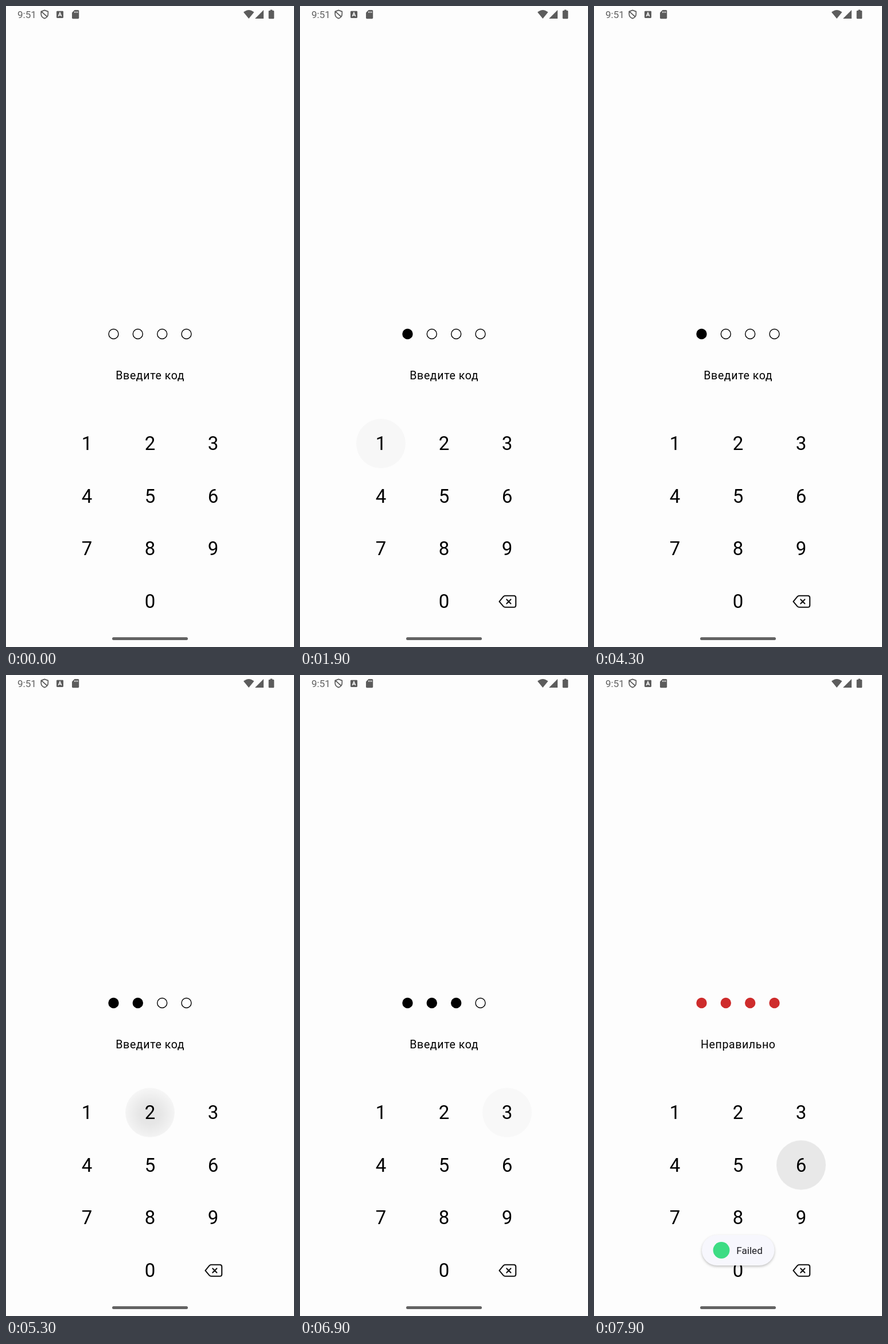
An HTML page that plays this animation: 502 px wide and 1116 px high, repeating every 8 s.

```html
<!DOCTYPE html>
<html lang="ru">
<head>
<meta charset="utf-8">
<title>PIN</title>
<style>
html, body { margin: 0; width: 100%; height: 100%; overflow: hidden; background: #fdfdfd; }
svg { display: block; width: 100vw; height: 100vh; }
text { font-family: Roboto, "Open Sans", sans-serif; }

.status text { font-size: 17.1px; fill: #606060; }
.icons { fill: #5c5c5c; }
.label { font-size: 19.54px; letter-spacing: .61px; text-anchor: middle; }
.keys { font-size: 33px; text-anchor: middle; }
.dots circle { fill: transparent; stroke: #000; stroke-width: 1.4; }
.erase { fill: none; stroke: #111; stroke-width: 2.1; stroke-linejoin: round; stroke-linecap: round; }
.ripple circle { opacity: 0; }

.dots circle, .erase, .label, .ripple circle { animation: 8s step-end infinite; }

/* Code dots */
.dots .d1 { animation-name: dot1; }
.dots .d2 { animation-name: dot2; }
.dots .d3 { animation-name: dot3; }
.dots .d4 { animation-name: dot4; }
@keyframes dot1 {
  0%, 37.5% { fill: transparent; stroke: #000; }
  16.25%, 53.75% { fill: #000; stroke: #000; }
  95%, 100% { fill: #ce2c2c; stroke: #ce2c2c; }
}
@keyframes dot2 {
  0% { fill: transparent; stroke: #000; }
  66.25% { fill: #000; stroke: #000; }
  95%, 100% { fill: #ce2c2c; stroke: #ce2c2c; }
}
@keyframes dot3 {
  0% { fill: transparent; stroke: #000; }
  78.75% { fill: #000; stroke: #000; }
  95%, 100% { fill: #ce2c2c; stroke: #ce2c2c; }
}
@keyframes dot4 {
  0% { fill: transparent; stroke: #000; }
  95%, 100% { fill: #ce2c2c; stroke: #ce2c2c; }
}

.erase { animation-name: erase; }
@keyframes erase {
  0%, 37.5% { opacity: 0; }
  16.25%, 53.75%, 100% { opacity: 1; }
}

.ask { animation-name: ask; }
.wrong { animation-name: wrong; }
@keyframes ask { 0% { opacity: 1; } 95%, 100% { opacity: 0; } }
@keyframes wrong { 0% { opacity: 0; } 95%, 100% { opacity: 1; } }

/* Key presses: a soft glow, then a flat disc that pales */
.k1 .glow { animation-name: glow1; }
.k1 .flat { animation-name: flat1; }
.k2 .glow { animation-name: glow2; }
.k2 .flat { animation-name: flat2; }
.k3 .glow { animation-name: glow3; }
.k3 .flat { animation-name: flat3; }
.k6 .glow { animation-name: glow6; }
.k6 .flat { animation-name: flat6; }
@keyframes glow1 {
  0%, 17.5%, 61.25%, 100% { opacity: 0; }
  16.25% { opacity: 1; }
  55% { opacity: .85; }
}
@keyframes flat1 {
  0%, 37.5%, 66.25%, 100% { opacity: 0; }
  17.5% { opacity: .058; }
  23.75%, 61.25% { opacity: .025; }
}
@keyframes glow2 {
  0%, 67.5%, 100% { opacity: 0; }
  66.25% { opacity: 1; }
}
@keyframes flat2 {
  0%, 78.75%, 100% { opacity: 0; }
  67.5% { opacity: .05; }
  72.5% { opacity: .022; }
}
@keyframes glow3 {
  0%, 80%, 100% { opacity: 0; }
  78.75% { opacity: 1; }
}
@keyframes flat3 {
  0%, 95%, 100% { opacity: 0; }
  80% { opacity: .083; }
  86.25% { opacity: .022; }
}
@keyframes glow6 {
  0%, 96.25%, 100% { opacity: 0; }
  95% { opacity: 1; }
}
@keyframes flat6 {
  0% { opacity: 0; }
  96.25%, 100% { opacity: .083; }
}

/* Toast */
.toast {
  transform-origin: 251px 1001.5px;
  filter: drop-shadow(0 2px 2px rgba(0, 0, 0, .24));
  animation: toast 8s linear infinite;
}
.toast text { font-size: 17.1px; fill: #1b1b20; }
.inner { animation: inner 8s linear infinite; }
@keyframes toast {
  0%, 95.6% { opacity: 0; transform: scale(.9); }
  97% { opacity: 1; }
  98.7%, 100% { opacity: 1; transform: none; }
}
@keyframes inner {
  0%, 96.2% { opacity: 0; }
  98.7%, 100% { opacity: 1; }
}
</style>
</head>
<body>
<svg viewBox="0 0 502 1116">
  <defs>
    <radialGradient id="tight" gradientUnits="userSpaceOnUse" cx="-2" cy="6" r="42">
      <stop offset="0" stop-opacity=".105"/>
      <stop offset=".35" stop-opacity=".09"/>
      <stop offset=".7" stop-opacity=".04"/>
      <stop offset="1" stop-opacity="0"/>
    </radialGradient>
    <radialGradient id="wide" gradientUnits="userSpaceOnUse" cx="0" cy="3" r="45">
      <stop offset="0" stop-opacity=".1"/>
      <stop offset=".4" stop-opacity=".09"/>
      <stop offset="1" stop-opacity=".03"/>
    </radialGradient>
  </defs>

  <g class="status">
    <text x="20" y="20.5">9:51</text>
    <path d="M67.2 7.4 L73.3 9.6 V14 Q73.3 19.5 67.2 21.6 Q61.2 19.5 61.2 14 V9.6 Z M62 9.8 L72 19" fill="none" stroke="#5c5c5c" stroke-width="1.7" stroke-linejoin="round"/>
    <g class="icons">
      <rect x="88" y="8.7" width="12" height="12.3" rx="1.4"/>
      <path d="M91.2 18 L94 11.5 L96.8 18 M92.2 16 H95.8" fill="none" stroke="#fdfdfd" stroke-width="1.4"/>
      <path d="M119.5 7 H125.6 Q127.2 7 127.2 8.6 V20.6 Q127.2 22.2 125.6 22.2 H116.6 Q115 22.2 115 20.6 V11.5 Z"/>
      <path d="M119.7 9.4 V12 M122.2 9.4 V12 M124.7 9.4 V12" stroke="#fdfdfd" stroke-width="1.2"/>
      <path d="M414 10.8 Q423.2 3.2 432.4 10.8 L423.2 22 Z"/>
      <path d="M449 7 V22 H434 Z"/>
      <path d="M460.6 8 V6.5 H464.4 V8 H466 Q467.3 8 467.3 9.3 V21 Q467.3 22.3 466 22.3 H459 Q457.7 22.3 457.7 21 V9.3 Q457.7 8 459 8 Z"/>
    </g>
  </g>

  <g class="dots">
    <circle class="d1" cx="187.5" cy="571" r="8.5"/>
    <circle class="d2" cx="229.8" cy="571" r="8.5"/>
    <circle class="d3" cx="272.2" cy="571" r="8.5"/>
    <circle class="d4" cx="314.5" cy="571" r="8.5"/>
  </g>

  <text class="label ask" x="251.3" y="650.3">Введите код</text>
  <text class="label wrong" x="251.3" y="650.3">Неправильно</text>

  <g class="ripple k1" transform="translate(141 761.7)">
    <circle class="flat" r="43"/><circle class="glow" r="43" fill="url(#tight)"/>
  </g>
  <g class="ripple k2" transform="translate(251 761.7)">
    <circle class="flat" r="43"/><circle class="glow" r="43" fill="url(#wide)"/>
  </g>
  <g class="ripple k3" transform="translate(361 761.7)">
    <circle class="flat" r="43"/><circle class="glow" r="43" fill="url(#tight)"/>
  </g>
  <g class="ripple k6" transform="translate(361 853.2)">
    <circle class="flat" r="43"/><circle class="glow" r="43" fill="url(#tight)"/>
  </g>

  <g class="keys">
    <text x="141" y="773.2">1</text>
    <text x="251" y="773.2">2</text>
    <text x="361" y="773.2">3</text>
    <text x="141" y="864.8">4</text>
    <text x="251" y="864.8">5</text>
    <text x="361" y="864.8">6</text>
    <text x="141" y="956.3">7</text>
    <text x="251" y="956.3">8</text>
    <text x="361" y="956.3">9</text>
    <text x="251" y="1047.8">0</text>
  </g>

  <path class="erase" d="M347.4 1036.8 L354.6 1028.2 Q355.9 1026.8 357.8 1026.8 H372.6 Q376.2 1026.8 376.2 1030.4 V1043.2 Q376.2 1046.8 372.6 1046.8 H357.8 Q355.9 1046.8 354.6 1045.4 Z M360.2 1033.2 L367.4 1040.4 M367.4 1033.2 L360.2 1040.4"/>

  <g class="toast">
    <rect x="188" y="975" width="126.5" height="53" rx="26.5" fill="#f7f7fd"/>
    <g class="inner">
      <circle cx="222" cy="1001.5" r="14.4" fill="#3ddc84"/>
      <text x="248.3" y="1008">Failed</text>
    </g>
  </g>

  <rect x="185" y="1099" width="132" height="5" rx="2.5" fill="#636363"/>
</svg>
</body>
</html>
```
